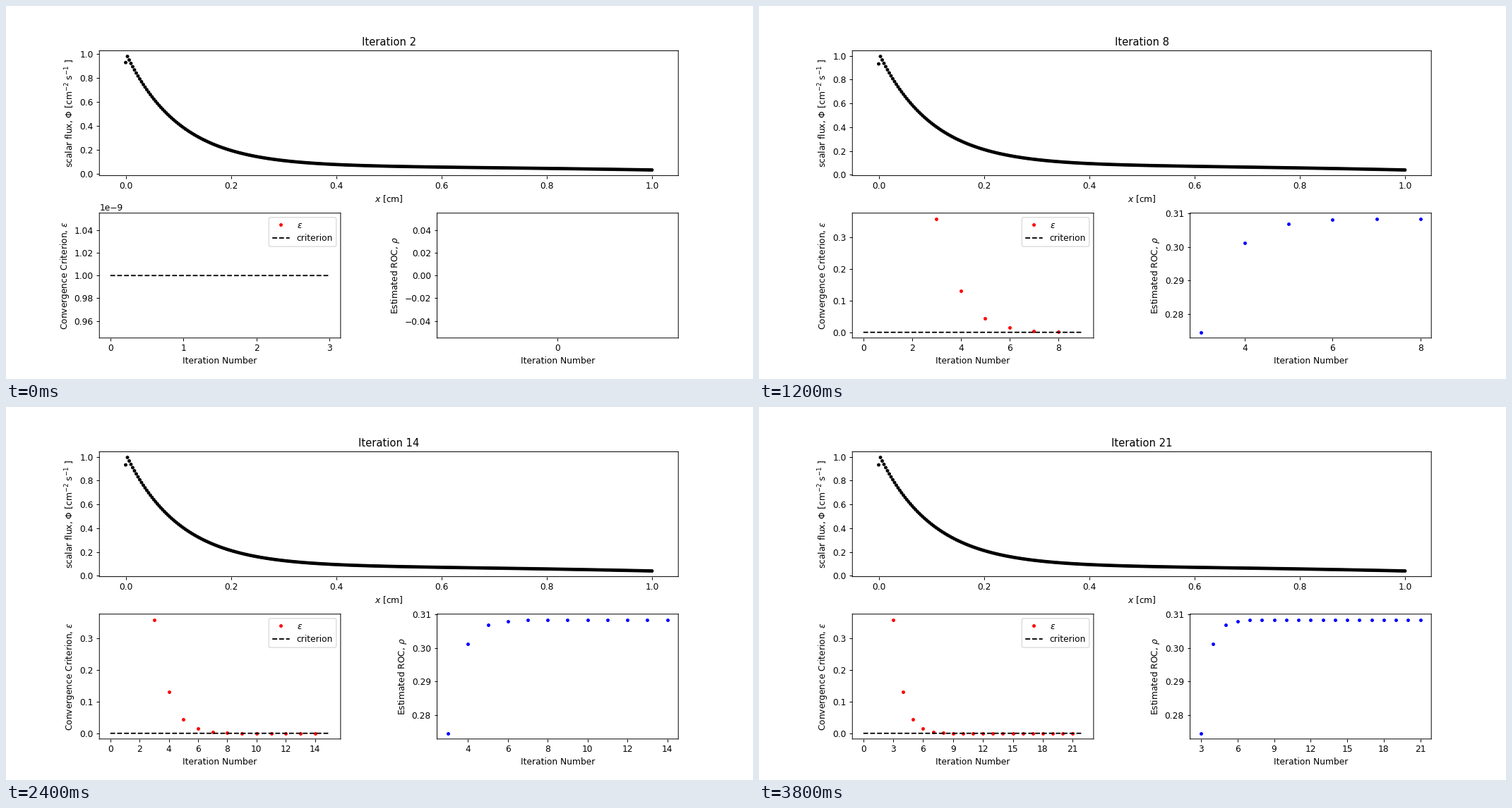
Recreate the animation shown at these times as a matplotlib script. Size 1058 by 529 pixels, loop 4 s.

```python
import numpy as np
import matplotlib.pyplot as plt
from matplotlib.animation import FuncAnimation
from matplotlib.ticker import MultipleLocator

CRITERION = 1e-9
FIRST, FRAMES, INTERVAL = 2, 20, 200
ROC_LIMIT = 0.30835
x = np.linspace(0, 1, 300)

# Soft, unsnapped lines keep every part at its true sub-pixel place.
plt.rcParams["path.snap"] = False


def flux(n):
    """Scalar flux after n iterations, settling geometrically."""
    gap = 0.308 ** (n - FIRST)
    tail = 0.0797 - 0.0177 * gap - (0.0388 - 0.0093 * gap) * x ** 2.5
    phi = (0.915 + 0.005 * gap) * np.exp(-9.78 * (x - x[1])) + tail
    phi[0] = 0.932 - 0.001 * gap
    return phi


def errors(steps):
    start = [0.3578, 0.1311, 0.0444, 0.0145]
    later = start[-1] * 0.3083 ** np.arange(1, FRAMES)
    return np.append(start, later)[:len(steps)]


def rates(steps):
    start = [0.2746, 0.30115, 0.30674, 0.30798]
    later = ROC_LIMIT - 0.00037 * 0.22 ** np.arange(1, FRAMES)
    return np.append(start, later)[:len(steps)]


fig = plt.figure(figsize=(12, 6), dpi=529 / 6, facecolor="white")
grid = fig.add_gridspec(2, 2, hspace=0.3, wspace=0.4)
top = fig.add_subplot(grid[0, :])
left = fig.add_subplot(grid[1, 0])
right = fig.add_subplot(grid[1, 1])


def label_steps(ax, n, ylabel):
    ax.set_xlabel("Iteration Number")
    ax.set_ylabel(ylabel)
    ax.xaxis.set_major_locator(MultipleLocator(round(n / 10) + 1))


def draw(frame):
    n = FIRST + frame
    steps = np.arange(FIRST + 1, n + 1)
    for ax in (top, left, right):
        ax.clear()

    # One colour per dot stops the renderer from rounding dot positions.
    top.scatter(x, flux(n), s=9, c=["k"] * x.size, linewidths=1)
    top.set_title(f"Iteration {n}")
    top.set_xlabel("$x$ [cm]", labelpad=3)
    top.set_ylabel(r"scalar flux, $\Phi$ [cm$^{-2}$ s$^{-1}$ ]")

    left.plot(steps, errors(steps), "r.", label=r"$\varepsilon$")
    left.plot(np.arange(n + 2), np.full(n + 2, CRITERION), "k--",
              label="criterion")
    left.legend(loc="upper right", labelspacing=0.45)
    label_steps(left, n, r"Convergence Criterion, $\varepsilon$")

    right.plot(steps, rates(steps), "b.")
    label_steps(right, n, r"Estimated ROC, $\rho$")
    return []


anim = FuncAnimation(fig, draw, frames=FRAMES, init_func=lambda: draw(0),
                     interval=INTERVAL, repeat=True, repeat_delay=0)
plt.show()
```
